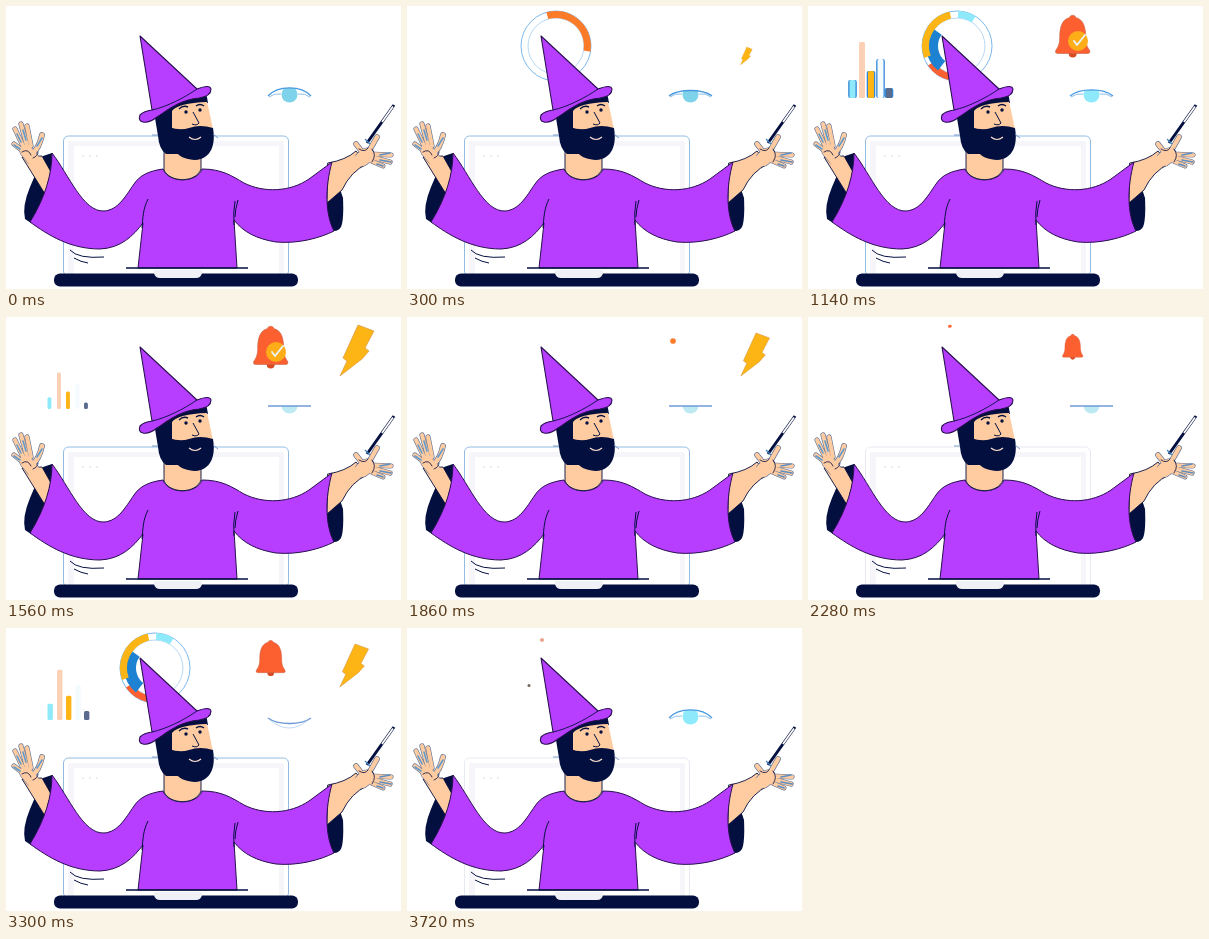
Animation, 395 px wide and 283 px high, one loop 3.78 s. Source, as an HTML page with a canvas:

```html
<!DOCTYPE html>
<html lang="en">
<head>
<meta charset="utf-8">
<title>Wizard</title>
<style>
html, body { margin: 0; width: 100%; height: 100%; overflow: hidden; background: #fff; }
canvas { display: block; width: 395px; height: 283px; }
</style>
</head>
<body>
<canvas id="stage"></canvas>
<script>
const W = 395, H = 283, LOOP = 3780, STEP = 60;
const INK = '#030f3f', PURPLE = '#b83eff', SEAM = '#27104f', SKIN = '#ffcba1', BLUE = '#2f86d8',
      ORANGE = '#fb7b28', RED = '#fc6030', YELLOW = '#fdb515', CYAN = '#8eeafa';
const stage = document.getElementById('stage');
const c = stage.getContext('2d');
const dpr = window.devicePixelRatio || 1;
stage.width = Math.round(W * dpr);
stage.height = Math.round(H * dpr);

const cache = {};
const path = d => cache[d] || (cache[d] = new Path2D(d));

function shape(d, fill, stroke, width = 1) {
  const p = path(d);
  if (fill) { c.fillStyle = fill; c.fill(p); }
  if (stroke) { c.strokeStyle = stroke; c.lineWidth = width; c.stroke(p); }
}
function box(x, y, w, h, r, fill, stroke, width = 1) {
  c.beginPath();
  c.roundRect(x, y, w, h, r);
  if (fill) { c.fillStyle = fill; c.fill(); }
  if (stroke) { c.strokeStyle = stroke; c.lineWidth = width; c.stroke(); }
}
function disc(x, y, r, fill) {
  c.beginPath();
  c.arc(x, y, Math.max(r, 0), 0, 7);
  c.fillStyle = fill;
  c.fill();
}
function scaled(x, y, s, draw) {
  if (s <= 0) return;
  c.save();
  c.translate(x, y);
  c.scale(s, s);
  draw();
  c.restore();
}
// Eased value from [time, value, time, value, ...]
function at(t, keys) {
  if (t <= keys[0]) return keys[1];
  for (let i = 2; i < keys.length; i += 2) {
    if (t <= keys[i]) {
      const k = (t - keys[i - 2]) / (keys[i] - keys[i - 2]);
      return keys[i - 1] + (keys[i + 1] - keys[i - 1]) * k * k * (3 - 2 * k);
    }
  }
  return keys[keys.length - 1];
}

function arc(r, w, color, from, to) {
  if (to <= from) return;
  c.beginPath();
  c.arc(149, 40, r, from * Math.PI / 180, to * Math.PI / 180);
  c.strokeStyle = color;
  c.lineWidth = w;
  c.stroke();
}
function donut(t) {
  const u = t < 2220 ? t : t - 2220;
  const w = Math.min(7, u / 24, (1500 - u) / 24);
  if (w <= 0) return;
  const head = at(u, [0, -106, 60, -100, 600, 162, 960, 304]);
  const tail = at(u, [360, -106, 600, -62, 1140, 104, 1500, 300]);
  c.lineCap = 'butt';
  if (u > 240 && u < 1380) {
    arc(35, .9, '#6fb0e8', 0, 360);
    arc(28, .8, '#a5cff2', 0, 360);
  }
  const part = (color, a, b, r = 31.5, width = w) =>
    arc(r, width, color, Math.max(a, tail), Math.min(b, head));
  part(t > 2220 ? RED : ORANGE, -106, 22);
  part(YELLOW, 24, 62);
  part(RED, 100, 146);
  if (u < 700) part(CYAN, 148, 162);
  else {
    part('#1d82d2', 128, 216, 25, 12);
    part(YELLOW, 160, 258);
    part(CYAN, 272, 302);
  }
}

function bars(t) {
  const g = at(t, [540, 0, 600, .04, 900, 1, 1320, 1, 1560, .65, 1740, 0, 2340, 0, 2700, 1, 3240, 1, 3540, 0]);
  if (g <= 0) return;
  if (g < .06) { disc(63, 91, 1.8, ORANGE); return; }
  const full = g > .9;
  [[41.5, 18, CYAN], [51, 56, '#fcd0b4'], [60, 27, YELLOW], [69.5, 39, '#f4fbff'], [78, 10, '#5b6b8e']]
    .forEach(([x, h, color], i) => {
      const w = full ? 6 : 6 * g;
      if (full && i !== 1) box(x - 1.3, 92 - h * g, w + 2.6, h * g, 2, BLUE);
      box(x, 92 - h * g, w, h * g, 1.5, color);
    });
}

function bell(t) {
  const s = at(t, [540, 0, 600, .2, 840, 1, 1680, 1, 1920, 0, 2160, 0, 2280, .6, 2400, 1, 3240, 1, 3480, 0]);
  if (s > .2) scaled(264.7, 29.5, s, () => {
    disc(0, 18, 4, '#d94b22');
    shape('M-3-18C-3-21 3-21 3-18C11-16 13-8 13 2C13 9 15 12 17 15Q18 18 15 18H-15Q-18 18-17 15C-15 12-13 9-13 2C-13-8-11-16-3-18Z', RED, '#c4664c', .6);
  });
  else if (s > .05) disc(266, 24, 18 * s, ORANGE);
  const k = at(t, [780, 0, 960, 1, 1560, 1, 1740, 0, 2340, 0, 2580, 1, 3120, 1, 3300, 0]);
  scaled(270, 35, k, () => {
    disc(0, 0, 10, '#fdad18');
    c.lineCap = 'round';
    shape('M-4 0L-1 4L7-6', null, '#e8f6ff', 1.8);
  });
}

function bolt(t) {
  const s = at(t, [180, 0, 480, 1, 780, 1, 1020, 0, 1260, 0, 1500, 1, 1800, 1, 2040, 0, 2640, 0, 2820, .56, 2940, 1, 3240, 1, 3480, 0]);
  const x = 333 + 18 * s, y = 59 - 25 * s;
  scaled(x, y, s, () => shape('M1-26L17-20L8-3L12 0L5 8L-17 25L-10 10L-14 7Z', YELLOW, '#d79a45', .7));
  const k = at(t, [420, 0, 540, 1, 660, 1, 780, 0]);
  scaled(351, 64, k, () => {
    shape('M11 5L20-4L23-1L15 5Z', YELLOW, '#f1922d', .8);
    shape('M-18 2L-14 0L-13 4L-16 4Z', ORANGE);
  });
  scaled(266, 24, at(t, [420, 0, 540, .8, 600, 1, 660, 0]), () => disc(0, 0, 3.6, ORANGE));
}

function eye(t) {
  const lid = at(t, [0, 8, 240, 8, 480, -9, 660, -9, 900, 6, 1260, 6, 1500, 0, 2280, 0, 2460, 7, 2640, 7, 2820, 0, 3060, -8, 3240, -8, 3480, 8, 3780, 8]);
  const y = 90 - Math.max(0, 1 - Math.abs(lid) / 6);
  const top = y - 1.35 * lid;
  const curve = `M262 ${y}C272 ${top} 295 ${top} 305 ${y}`;
  const open = lid > 4;
  c.save();
  c.clip(new Path2D(curve + 'V112H262Z'));
  disc(283.5, 88.5, 8, open ? (t > 600 ? CYAN : '#7ed3ea') : '#bdeaf2');
  c.restore();
  c.strokeStyle = open ? '#4a9ae0' : '#6f9bd6';
  c.lineWidth = 1.3;
  c.stroke(new Path2D(curve));
  if (open) shape('M263 91Q268 87 275 88M292 88Q299 87 304 91', null, '#7fb7e6', .9);
  if (lid < -4) shape('M264 92Q283 108 302 92', null, '#a8c8ee', .7);
}

function sparks(t) {
  if (t < 3660) return;
  disc(135, 12, 2, '#e8a58d');
  disc(122, 57.5, 1.5, '#75645a');
}

function laptop(t) {
  const dim = (t > 2160 && t < 2520) || t > 3480;
  box(57.5, 130, 225, 140, 5, '#fff', dim ? '#e3e8f0' : '#86b5e0', .9);
  box(62, 135, 216, 134, 2, '#f6f6fa');
  box(68, 140, 205, 130, 1, '#fff');
  [77, 84, 91].forEach(x => disc(x, 150, .9, '#e2e4ec'));
  box(48, 267.5, 244, 13, 6, INK);
  shape('M148 264H196V267Q195 272 190 272H154Q149 272 148 267Z', '#f0f1f6');
}

function limb(lines, widths) {
  c.lineCap = c.lineJoin = 'round';
  lines.forEach((d, i) => shape(d, null, '#5b6f92', widths[i] + 1.2));
  lines.forEach((d, i) => shape(d, null, SKIN, widths[i]));
}

function arms() {
  // Left cuff and hand
  shape('M46 147L37 150L33 160L24 181Q16 200 19 213L25 217L48 190Z', INK);
  shape('M16 151L39 188L45 166L36 150Z', SKIN, INK, .9);
  limb(['M17 145L8 138', 'M18 142L9 123', 'M21 140L15 118', 'M25 140L21 120', 'M27 147Q33 142 36 129', 'M20 145L27 153'],
       [4, 4, 4, 4, 4.6, 12]);
  shape('M18 149L34 178L42 180L35 151Z', SKIN);
  shape('M11 128L15 136M17 124L20 134M8 139L14 143M31 140L36 132', null, '#5d9bd0', 1.6);
  shape('M16 146Q22 142 25 149M27 152Q32 150 32 146', null, INK, .8);
  // Right cuff and hand
  shape('M325 156L337 192Q338 214 335 221Q331 227 324 224L316 190Z', INK);
  shape('M322 157Q340 154 350 145L361 158Q345 165 336 184L321 197Z', SKIN, INK, .9);
  limb(['M361 149L356 153', 'M364 148L385 149', 'M365 151L384 156', 'M363 154L377 160', 'M357 147L350 138', 'M363 145L371 131'],
       [14, 4, 4, 3.6, 4.4, 4.4]);
  shape('M324 159Q341 156 352 149L358 158Q344 165 336 180L323 192Z', SKIN);
  shape('M374 149L384 147M374 154L385 156M371 158L377 160', null, '#5d8fc2', 1.6);
  shape('M353 143Q359 147 362 142M366 143Q371 149 366 156', null, INK, .8);
  // Wand
  c.lineCap = 'butt';
  shape('M361 137L388 99', null, INK, 3);
  shape('M376 116L387 100.5', null, '#fff', 1.8);
  shape('M359 133L364 138', null, '#4386c4', 1.3);
}

function robe() {
  shape('M157 163C143 165 134 169 128 178C119 191 112 204 98 205C77 206 63 169 46 147C46 168 39 192 24 216C42 229 64 243 94 243C115 242 127 230 137 217L132 262H231L228 214C237 226 251 233 270 236C292 238 314 232 328 225C319 208 319 181 326 156L303 173C284 186 258 187 238 177C226 170 216 163 196 163C191 177 163 178 157 163Z', PURPLE, SEAM, 1);
  shape('M142 193C137 203 137 211 136 222M229 195Q227 207 228 219M232 194Q229 204 229 211', null, INK, 1);
  shape('M120 262H242', null, INK, 1.3);
  shape('M64 244Q72 253 98 251M68 252Q75 256 82 257', null, INK, 1);
}

function head() {
  shape('M158 138V164C164 177 190 177 195 163V146Z', SKIN, INK, .9);
  shape('M148 106L154 96L200 86L202 97L172 102L167 126L176 148H160Q153 143 152 130Z', INK);
  shape('M166 105Q172 97 201 96Q204 108 207 124L166 128Z', SKIN);
  shape('M163 121Q174 125 183 122Q194 118 207 122C210 139 205 153 189 154C174 153 164 147 163 121Z', INK);
  shape('M146 129H152M207 128L212 132', null, '#6f8fc2', .9);
  shape('M183 131Q189 136 195 131', null, '#ffe3d0', 1.2);
  shape('M187 106L193 117Q191 120 186 118', null, INK, 1);
  shape('M173 103Q177 99 182 101M190 100Q194 97 198 100', null, INK, 1.4);
  disc(180, 106, 1.7, INK);
  disc(194, 104, 1.7, INK);
}

function hat() {
  shape('M134 30L191 83Q204 78 205 83C205 89 200 91 193 92C173 94 162 104 151 111C146 115 142 117 137 116Q132 115 134 109Q138 105 146 104Z', PURPLE, SEAM, 1.1);
  shape('M146 104C160 101 178 92 191 83', null, INK, .9);
}

function draw(t) {
  c.setTransform(dpr, 0, 0, dpr, 0, 0);
  c.fillStyle = '#fff';
  c.fillRect(0, 0, W, H);
  [donut, bars, bell, bolt, eye, sparks, laptop, arms, robe, head, hat].forEach(part => part(t));
}

const start = performance.now();
function tick() {
  const t = (performance.now() - start) % LOOP;
  draw(Math.floor(t / STEP) * STEP);
  requestAnimationFrame(tick);
}
tick();
</script>
</body>
</html>
```
